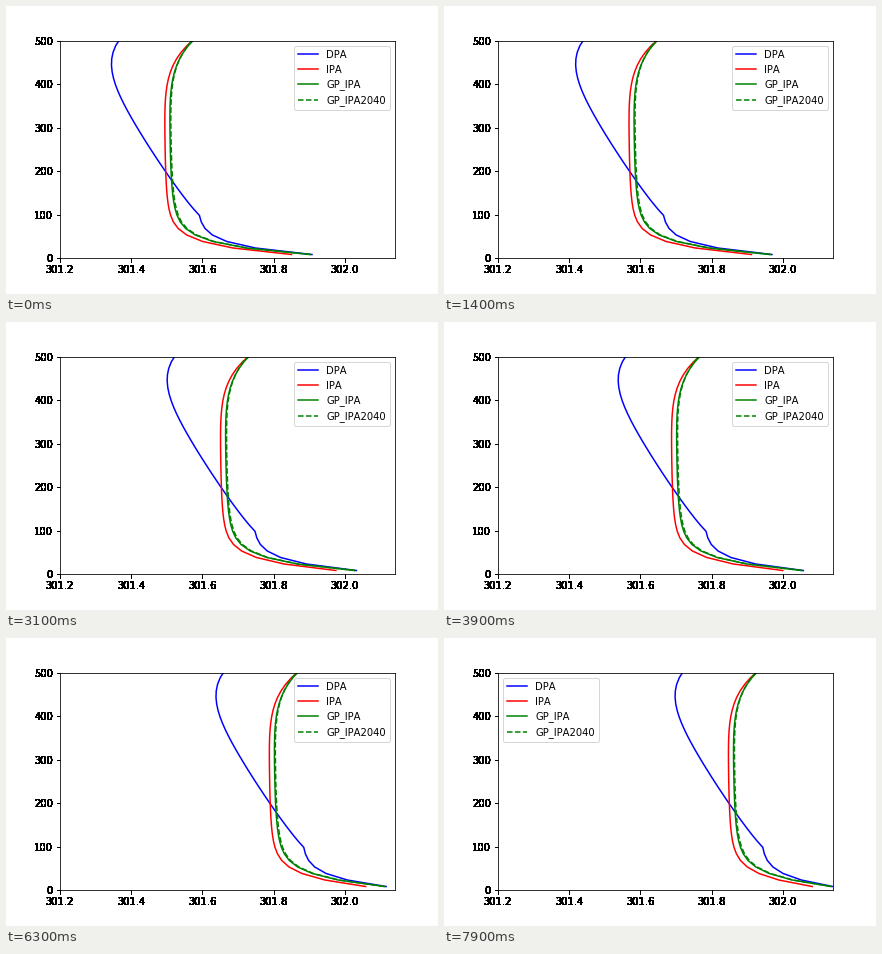
A matplotlib script for the animation above (8000 ms loop, 432 by 288 pixels).

```python
import numpy as np
import matplotlib.pyplot as plt
from matplotlib.animation import FuncAnimation

FRAMES, STEP = 80, 100
LEGEND_JUMP = 6400
OVERDRAW = 60                  # ticks look as if printed this many times
HEIGHTS = np.arange(8, 510, 15)

# name, style, base, surface excess, lower-layer excess, top excess, lean
SERIES = [
    ("DPA", "b-", 301.586, 0.3215, 0, 0.0758, 1),
    ("IPA", "r-", 301.4934, 0.320, 0.0365, 0.0786, 0),
    ("GP_IPA", "g-", 301.5074, 0.348, 0.0477, 0.066, 0),
    ("GP_IPA2040", "g--", 301.510, 0.3425, 0.0505, 0.0604, 0),
]


def decay(scale):
    """1 at the lowest level, fading with height."""
    return np.exp(-(HEIGHTS - HEIGHTS[0]) / scale)


def shape(base, surface, lower, top, lean):
    """Profile at the start: warm surface, bent top, optional tilt."""
    above = np.maximum(HEIGHTS - 98, 0)
    bend = (np.maximum(HEIGHTS - 250, 0) / 250) ** 4.6
    tilt = -0.000941 * above + 5.05e-7 * above ** 2
    return (base + surface * decay(22) + lower * decay(80)
            + top * bend + lean * tilt)


def warming(t):
    """Slowing drift after t seconds; the surface lags behind."""
    drift = 0.0542 * t - 0.00121 * t ** 2
    lag = 0.0070 * t + 0.00104 * t ** 2
    return drift - lag * decay(17)


def saturate(img, dpi):
    """Blacken soft edges the way repeated drawing does."""
    out = np.zeros_like(img)
    out[..., 3] = 1 - (1 - img[..., 3]) ** OVERDRAW
    return out, 0, 0


plt.rcParams["text.kerning_factor"] = 6
fig = plt.figure(figsize=(6, 4), dpi=72, facecolor="white")
ax = fig.add_axes([0.125, 0.125, 0.775, 0.755])
ax.set_xlim(301.2, 302.14)
ax.set_ylim(0, 500)
ax.set_xticks([301.2, 301.4, 301.6, 301.8, 302.0])
for axis in (ax.xaxis, ax.yaxis):
    axis.set_agg_filter(saturate)

starts = [shape(*params) for _, _, *params in SERIES]
lines = [ax.plot(start, HEIGHTS, style, lw=1.5, label=name)[0]
         for start, (name, style, *_) in zip(starts, SERIES)]
legend = ax.legend(loc="upper right")


def update(frame):
    t = frame * STEP
    for line, start in zip(lines, starts):
        line.set_xdata(start + warming(t / 1000))
    legend.set_loc("upper right" if t < LEGEND_JUMP else "upper left")
    return lines


anim = FuncAnimation(fig, update, frames=FRAMES, interval=STEP,
                     repeat=True, repeat_delay=0, blit=False)
plt.show()
```
